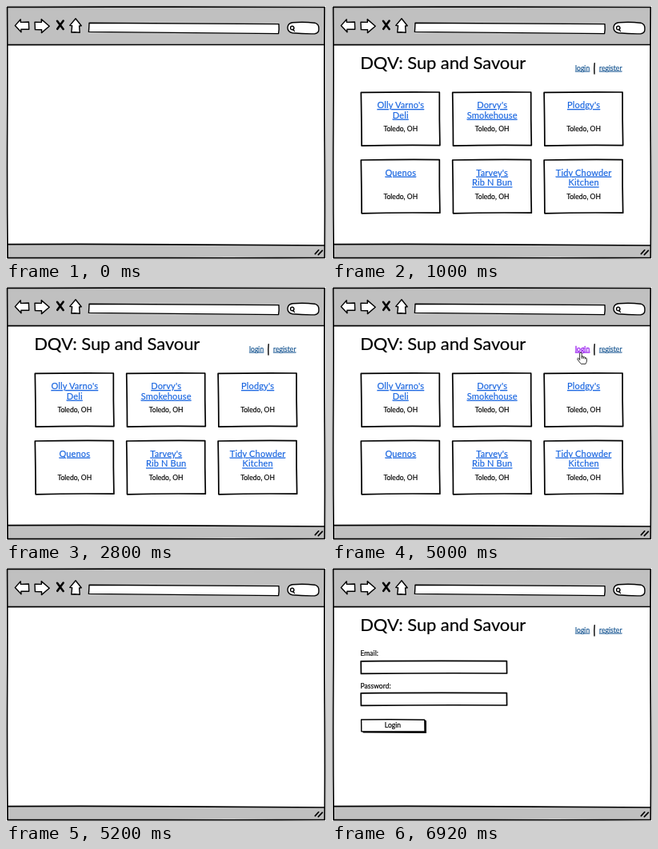
These frames come from a looping animation (400 px wide and 317 px high, 8000 ms). An HTML page:

```html
<!DOCTYPE html>
<html lang="en">
<head>
<meta charset="utf-8">
<title>Sketch wireframe</title>
<style>
  html, body { margin: 0; width: 100%; height: 100%; overflow: hidden; background: #fff; }
  svg { display: block; width: 100vw; height: 100vh; }
  text { font: 8.5px Lato, "Open Sans", sans-serif; letter-spacing: .05px; color: #000;
    fill: currentColor; stroke: currentColor; stroke-width: .18; }
  .title { font-size: 22px; letter-spacing: -.1px; }
  .mid { text-anchor: middle; }
  .link { font-size: 11px; letter-spacing: .15px; color: #1a66e0; }
  .nav { color: #12528f; }
  .link, .nav { text-decoration: underline; text-decoration-skip-ink: none; }
  .nav.pressed { color: #9a1ff0; stroke-width: .4; }
  .ink { fill: none; stroke: #000; stroke-width: 1.7; stroke-linejoin: round; stroke-linecap: round; }
  .paper { fill: #fff; }
  .thin { stroke-width: 1.4; }
  .fat { stroke-width: 2.6; }
  .fine { stroke-width: .8; }
</style>
</head>
<body>
<svg viewBox="0 0 400 317" preserveAspectRatio="none">
  <g id="chrome">
    <path fill="#c0c0c0" d="M2 1.5H398V48.5H2ZM2 298.6L140 298.6L398 300V315.5H2Z"/>
    <path class="ink" d="M1.5 1.4Q120 .8 210 1.2T398.3 1.5Q397.8 90 398.3 170T398.3 315.4Q300 316 200 315.6T2 315.6Q1.2 230 1.6 150T1.5 1.4"/>
    <path class="ink" d="M2 48.6Q100 48.2 200 48.5T398 48.5M2 298.6Q110 298 210 298.8T398 300"/>
    <g class="ink paper thin">
      <path d="M11.3 24.6L18.2 16.8L18.4 20.4L28.4 20L28.7 29.2L18.8 29.2L19 32.8Z"/>
      <path d="M54.2 25.2L44.2 16.6L44.4 20.4L36 20.2L36.4 29.6L44.6 29.8L44.4 33.6Z"/>
      <path d="M87 15.8L79.8 24.4L82.6 24.8L81.8 33L86 32.8L92.2 33.2L91.6 25L94.2 24.8Z"/>
      <path d="M104 21.2Q220 21.4 341 22.6Q341.6 29 340.6 34.6Q230 33.4 103.4 32.4Q103.8 27 104 21.2Z"/>
      <path d="M358 20.8Q372 19.6 386 21.2Q391.6 23 391 29Q391 34.2 386 34.8Q371 35 358 33.8Q352 32.4 352 27Q352.4 21.8 358 20.8Z"/>
    </g>
    <path class="ink fat" d="M64 18.8L71.6 29M71.6 18.6L64.2 28.8"/>
    <path class="ink thin" d="M355.6 27.4a2.2 2.2 0 1 1 4.4 .2a2.2 2.2 0 1 1 -4.4 -.2M358.8 29.6L360.4 31.4"/>
    <path class="ink" d="M386.4 310.6L390.8 305.8M390.4 311.6L395.4 306.4"/>
  </g>

  <g id="header">
    <text class="title" x="35.2" y="79.2">DQV: Sup and Savour</text>
    <text class="nav" id="login" x="304" y="80.6">login</text>
    <path class="ink thin" d="M328.2 71.8Q327.6 78 328 85"/>
    <text class="nav" x="334" y="80.6">register</text>
  </g>

  <g id="list"></g>

  <g id="form">
    <text x="35.4" y="110.4">Email:</text>
    <path class="ink" d="M36.2 116.8Q120 116 218.4 116.6L218.6 132Q130 131.4 36.4 132.4Z"/>
    <text x="35.4" y="150.6">Password:</text>
    <path class="ink" d="M36.2 156.8Q120 156 218.4 156.6L218.6 172Q130 171.4 36.4 172.4Z"/>
    <path d="M38 205H116V190.6L118 191.6V207L39 206.6Z"/>
    <path class="ink paper thin" d="M36.6 190Q80 189.4 115.8 190.2L116 204.8Q80 205.2 36.8 204.8Z"/>
    <text class="mid" x="76" y="200.4">Login</text>
  </g>

  <path id="hand" class="ink paper fine" d="M309.6 91V83.2Q309.8 81.8 311 82Q312.2 82 312.2 83.4V87.2Q313.2 86.2 314.2 87.4V88Q315.4 87 316.4 88.4V89Q318.2 88.2 318.4 90V93Q318 94.6 317 96.4H311.4Q309.4 94.4 307 90.8Q306.4 89.4 307.6 89Q308.6 89.4 309.6 91ZM312.2 87.2V89.4M314.2 88V89.6M316.4 89V90"/>
</svg>
<script>
const $ = id => document.getElementById(id);

const places = [
  ["Olly Varno's", "Deli"], ["Dorvy's", "Smokehouse"], ["Plodgy's"],
  ["Quenos"], ["Tarvey's", "Rib N Bun"], ["Tidy Chowder", "Kitchen"]
];

const label = (x, y, text, kind = "") =>
  `<text class="mid ${kind}" x="${x}" y="${y}">${text}</text>`;

// Slightly uneven box, as if drawn by hand
function box(x, y) {
  return `<path class="ink" d="M${x} ${y + .4}Q${x + 50} ${y - .4} ${x + 98} ${y}
    Q${x + 97.8} ${y + 34} ${x + 98.6} ${y + 66.6}Q${x + 46} ${y + 66} ${x + .8} ${y + 67.2}
    Q${x + .6} ${y + 30} ${x} ${y + .4}"/>`;
}

$("list").innerHTML = places.map((lines, i) => {
  const x = 36.3 + i % 3 * 114.4;
  const y = 108 + Math.floor(i / 3) * 84.6;
  const mid = x + 49.5;
  return box(x, y)
    + lines.map((line, n) => label(mid, y + 20 + n * 12.8, line, "link")).join("")
    + label(mid, y + 49, "Toledo, OH");
}).join("");

// Start time and the parts visible from then on
const steps = [
  [0, []],
  [1000, ["header", "list"]],
  [4000, ["header", "list", "hand"]],
  [5000, ["header", "list", "hand", "pressed"]],
  [5200, []],
  [5300, ["header", "form"]]
];
const loop = 8000;
const start = performance.now();

function draw(now) {
  const t = Math.max(0, now - start) % loop;
  const shown = steps.filter(step => step[0] <= t).pop()[1];
  for (const id of ["header", "list", "form", "hand"])
    $(id).style.display = shown.includes(id) ? "" : "none";
  $("login").classList.toggle("pressed", shown.includes("pressed"));
  requestAnimationFrame(draw);
}
draw(start);
</script>
</body>
</html>
```
